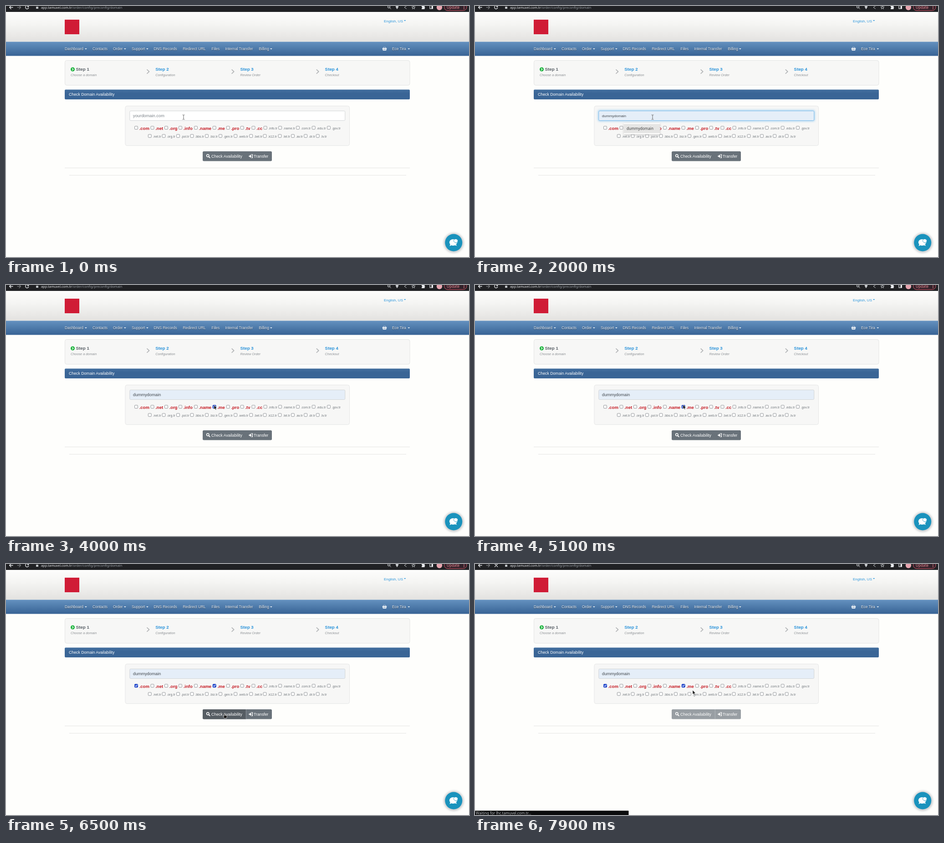
Recreate the animation shown at these times as an HTML page. Size 1017 px wide and 551 px high, loop 8 s.

```html
<!DOCTYPE html>
<html lang="en">
<head>
<meta charset="utf-8">
<title>Check Domain Availability</title>
<style>
html, body { margin: 0; width: 100%; height: 100%; overflow: hidden; background: #fefefc; }
svg { display: block; width: 100%; height: 100%; }
text { font-family: "Liberation Sans", Arial, sans-serif; white-space: pre; }
.ui { font-family: "Noto Sans", "Open Sans", sans-serif; }
.line { fill: none; stroke-linecap: round; stroke-linejoin: round; }
.nav { font-size: 8.4px; fill: #eef2f6; text-shadow: 0 .6px .8px #1d3552; }
.step { font-size: 9.8px; font-weight: bold; fill: #2b93da; }
.hint { font-size: 7.3px; font-style: italic; fill: #8d9195; }
.tld { font-size: 9.5px; font-weight: bold; fill: #c4161f; }
.sub { font-size: 7.1px; fill: #70767b; }
.btn { font-size: 8.75px; fill: #fff; }
.item { font-size: 8.2px; fill: #3a3a3a; }
</style>
</head>
<body>
<svg viewBox="0 0 1017 551" preserveAspectRatio="none">
  <defs>
    <linearGradient id="headFill" x2="0" y2="1"><stop stop-color="#fdfdfc"/><stop offset=".4" stop-color="#f5f5f3"/><stop offset="1" stop-color="#e3e2e0"/></linearGradient>
    <linearGradient id="navFill" x2="0" y2="1"><stop stop-color="#6491bf"/><stop offset="1" stop-color="#386395"/></linearGradient>
    <linearGradient id="titleFill" x2="0" y2="1"><stop stop-color="#436f9f"/><stop offset=".4" stop-color="#3a6596"/><stop offset="1" stop-color="#3a6596"/></linearGradient>
    <filter id="blur" x="-50%" y="-50%" width="200%" height="200%"><feGaussianBlur stdDeviation="2.2"/></filter>
  </defs>

  <rect width="1017" height="551" fill="#fefefc"/>
  <rect y="13" width="1017" height="65.5" fill="url(#headFill)"/>
  <rect y="78.5" width="1017" height="31" fill="url(#navFill)"/>
  <rect x="129" y="30" width="32" height="32" fill="#d01c36"/>

  <!-- browser bar -->
  <rect width="1017" height="13" fill="#202124"/>
  <g class="line" stroke="#e8eaed" stroke-width="1.3">
    <path d="M15 3H7.5M11-.5 7.5 3 11 6.5"/>
    <path d="M25 3H32.500M29-.5 32.500 3 29 6.500" stroke="#77797c"/>
    <path id="reload" d="M49 .5A3.600 3.600 0 1 0 49.700 4M49.700-1V1.500H47"/>
    <path id="stop" d="M43.500 0 49.500 6M49.500 0 43.500 6"/>
  </g>
  <rect x="66" y="1.500" width="5" height="4.500" rx=".6" fill="#c4c7ca"/>
  <text class="ui" x="77" y="5.800" font-size="7.35" fill="#e8eaed">app.tamuvel.com.tr<tspan fill="#9aa0a6">/order/config/preconfig/domain</tspan></text>
  <g class="line" stroke="#c4c7ca">
    <circle cx="841" cy="2" r="2.700"/><path d="M843 4 845.500 6.500M839.800 2H842.200"/>
    <path d="M879.500 0 875 3 879.500 6"/>
    <path d="M895-1 896 2H899L896.600 3.800 897.500 6.500 895 5 892.500 6.500 893.400 3.800 891 2H894Z"/>
  </g>
  <path d="M859 7C856 3 856 2 856 1A3 3 0 0 1 862 1C862 2 862 3 859 7Z" fill="#c4c7ca"/>
  <path d="M913 0H915A1.500 1.500 0 0 1 918 0H919.500V2.200A1.500 1.500 0 0 1 919.500 5V7H913V4.800A1.300 1.300 0 0 0 913 2.200Z" fill="#e8eaed"/>
  <path d="M930.500-1H938V6.500H930.500ZM931.700 0V5.300H934.500V0Z" fill="#e8eaed" fill-rule="evenodd"/>
  <circle cx="952" cy="3" r="6.200" fill="#e7a5b0"/>
  <rect x="962.500" y="-5" width="49.500" height="15" rx="7.500" fill="#33222a" stroke="#dd5a6d"/>
  <text class="ui" x="968" y="5.800" font-size="8.200" fill="#f28b96">Update</text>
  <g fill="#f28b96"><circle cx="1006" cy="0" r=".9"/><circle cx="1006" cy="3" r=".9"/><circle cx="1006" cy="6" r=".9"/></g>

  <!-- page frame -->
  <text x="830" y="35.500" font-size="8.050" fill="#2f97dc">English, US</text>
  <path d="M874 31H878.400L876.200 33.300Z" fill="#2f97dc"/>
  <g id="nav"></g>
  <path d="M827 92.500H836L834.800 97.500H828.200ZM828.500 92.500 830.500 89.500M834.500 92.500 832.500 89.500" fill="#eef2f6" stroke="#eef2f6" stroke-width=".8"/>
  <path d="M829.700 94V96.300M831.500 94V96.300M833.300 94V96.300" stroke="#47719f" stroke-width=".7"/>
  <rect x="129.500" y="119.500" width="757.500" height="54.500" rx="4" fill="#f7f7f6" stroke="#e3e4e4"/>
  <g id="steps"></g>
  <circle cx="146.500" cy="139" r="4.500" fill="#1fb53f"/>
  <path class="line" d="M145.600 136.900 147.900 139 145.600 141.100" stroke="#fff" stroke-width="1.300"/>
  <rect x="129" y="183.500" width="758" height="21.500" rx="2" fill="url(#titleFill)"/>
  <text x="138" y="197" font-size="8.740" fill="#fff">Check Domain Availability</text>
  <rect x="262" y="219.500" width="492.500" height="87" rx="4" fill="#f7f7f6" stroke="#e5e6e6"/>
  <path d="M129 355.500H887M139 371.500H879" stroke="#e4e4e3"/>

  <!-- search form -->
  <rect id="glow" x="270" y="228.300" width="476.500" height="25" rx="4" fill="#6fb8ee" filter="url(#blur)"/>
  <rect id="field" x="271.800" y="230.300" width="473" height="21.200" rx="2.300"/>
  <text id="value" x="279" y="243.600"></text>
  <rect id="caret" y="236" width=".8" height="9.500" fill="#333"/>
  <g id="boxes"></g>
  <g id="buttons">
    <rect x="432" y="319" width="152" height="21.500" rx="2.500" fill="#69727a"/>
    <path id="hover" d="M434.500 319H527V340.500H434.500A2.500 2.500 0 0 1 432 338V321.500A2.500 2.500 0 0 1 434.500 319Z" fill="#565d63"/>
    <path id="split" d="M527.300 319V340.500" stroke="#9aa1a7" stroke-width=".8"/>
    <g class="line" stroke="#fff"><circle cx="443.300" cy="328.600" r="2.700" stroke-width="1.500"/><path d="M445.500 330.800 447.800 333.100" stroke-width="1.900"/><path d="M539 326.200H541.500V333.200H539" stroke-width="1.300"/></g>
    <path d="M533.500 328.500H536V326L539.800 329.700 536 333.400V330.900H533.500Z" fill="#fff"/>
    <text class="btn" x="451" y="332.700">Check Availability</text>
    <text class="btn" x="544" y="332.700">Transfer</text>
  </g>
  <g id="list"></g>

  <!-- chat bubble -->
  <circle cx="983.500" cy="520" r="22" fill="#b9bcc0" opacity=".75" filter="url(#blur)"/>
  <circle cx="983.300" cy="519.500" r="19" fill="#1a93bd"/>
  <path d="M982 512C987 512 990.500 515 990.500 519S987 526 982 526C980.500 526 979.500 525.700 978.500 525.300L974.500 527 975.800 523C974.500 521.800 974 520.500 974 519C974 515 977.500 512 982 512Z" fill="#fff"/>
  <path d="M987 511.500C990 511 992.500 513 992.500 515.500 992.500 516.800 992 517.500 991.300 518.200L992.500 520.500 989 519.500C986 520 983.500 518 983.500 515.500S985 511.700 987 511.500Z" fill="#fff" stroke="#1a93bd" stroke-width=".8"/>
  <path d="M987 521.500 990.500 526.500 985 525Z" fill="#fff"/>

  <g id="status"><rect y="541.500" width="337.500" height="10" rx="1" fill="#0b0c0d"/><text class="ui" x="1.500" y="549.700" font-size="8.200" fill="#b9bcbf">Waiting for lhc.tamuvel.com.tr…</text></g>

  <g id="cursor">
    <path id="beam" class="line" d="M-2-5C-.8-5 0-4.600 0-4 0-4.600.8-5 2-5M0-4V4M-2 5C-.8 5 0 4.600 0 4 0 4.600.8 5 2 5" stroke="#555" stroke-width=".9"/>
    <path id="arrow" d="M0 0V9L2.100 7.200 3.500 10.200 5 9.500 3.700 6.600H6.500Z" fill="#111" stroke="#fff" stroke-width=".6"/>
    <path id="hand" d="M-1 0C-1-1.300 1-1.300 1 0V3.200L4 3.700C5.200 4 5.400 4.700 5.300 5.700L4.600 9.500H-.8L-3 6C-3.500 5-2.300 4.300-1 5.600Z" fill="#111" stroke="#fff" stroke-width=".7"/>
  </g>
</svg>

<script>
const LOOP = 8000, STEP = 100;
const $ = id => document.getElementById(id);
const show = (id, on) => $(id).style.display = on ? "" : "none";
const clamp = v => Math.max(0, Math.min(1, v));
const text = (cls, x, y, s) => `<text class="${cls}" x="${x}" y="${y}">${s}</text>`;

// label, x, optional x of the dropdown triangle
const menu = [["Dashboard", 129, 173], ["Contacts", 190], ["Order", 235, 259], ["Support", 276, 308],
  ["DNS Records", 324.5], ["Redirect URL", 388.5], ["Files", 451.5], ["Internal Transfer", 481.5],
  ["Billing", 555.5, 580], ["Ece Tira", 848, 882.5]];
$("nav").innerHTML = menu.map(([s, x, tri]) => text("nav", x, 97, s) +
  (tri ? `<path d="M${tri} 93h4.800l-2.400 2.500z" fill="#eef2f6"/>` : "")).join("");

$("steps").innerHTML = ["Choose a domain", "Configuration", "Review Order", "Checkout"].map((s, i) => {
  const x = 142 + 186.200 * i;
  return (i ? text("step", x, 142.300, "Step " + (i + 1)) : '<text class="step" x="153.500" y="142.300" style="fill:#596067">Step 1</text>')
    + text("hint", x, 153.700, s)
    + (i < 3 ? `<path class="line" d="M${x + 168} 139.800l4.500 4.200-4.500 4.200" stroke="#b5b7b9" stroke-width="1.800"/>` : "");
}).join("");

const rows = [
  [267.3, "com 286 net 321.5 org 352 info 383 name 417 me 457.7 pro 487.7 tv 518.7 cc 543.5 " +
    "info.tr 569.7 name.tr 602.2 com.tr 641 edu.tr 675.7 gov.tr 709"],
  [285.3, "net.tr 315.8 org.tr 346.5 pol.tr 378 bbs.tr 408.5 biz.tr 441 gen.tr 471 web.tr 504.2 " +
    "bel.tr 538.3 k12.tr 568.5 tel.tr 601.5 av.tr 630 dr.tr 658.2 tv.tr 684.7"]];
const square = (x, y, look) => `<rect x="${x - 3.4}" y="${y - 3.4}" width="6.800" height="6.800" rx="1.200" ${look}/>`;
const ticked = (id, x, y) => `<g id="${id}">${square(x, y, 'fill="#2148cf" stroke="#2148cf"')}` +
  `<path class="line" d="M${x - 2} ${y}l1.500 1.600 2.600-3.300" stroke="#fff" stroke-width="1.200"/></g>`;
$("boxes").innerHTML = rows.map(([y, list]) => list.match(/\S+ \S+/g).map(pair => {
  const [name, pos] = pair.split(" "), x = +pos, small = name.includes(".");
  return square(x, y, 'fill="#fff" stroke="#777b80" stroke-width=".8"')
    + text(small ? "sub" : "tld", x + 6.7, y + (small ? 3.700 : 4.200), "." + name);
}).join("")).join("") + ticked("com", 286, 267.3) + ticked("me", 457.7, 267.3);

const past = ["test.com.tr", "28kasim1.biz.tr", "test.gov.tr", "asd", "test", "a"];
let listKey = "";
function drawList(items, lit) {
  const key = items + lit;
  if (key === listKey) return;
  listKey = key;
  const h = items.length * 19.9 + 4.5;
  $("list").innerHTML = !items.length ? "" :
    `<rect x="327" y="258.500" width="79" height="${h}" fill="#999" opacity=".55" filter="url(#blur)"/>` +
    `<rect x="326.500" y="257" width="79.500" height="${h}" rx="1" fill="#fefefd"/>` +
    (lit ? '<rect x="326.500" y="259" width="79.500" height="20" fill="#e5e5e4"/>' : "") +
    items.map((s, i) => text("item ui", 333, 271.7 + 19.9 * i, s)).join("");
}

const WORD = "dummydomain";
const typed = [[800, 1], [1000, 2], [1300, 3], [1400, 4], [2000, 11]];

// time, x, y of the pointer
const path = [[0, 390, 244], [2800, 390, 244], [3200, 463, 275], [3400, 465, 279], [3700, 457, 264],
  [4300, 457, 264], [4500, 422, 259], [4900, 505, 264], [5000, 505, 264], [5100, 457, 263],
  [5200, 350, 266], [5300, 350, 266], [5700, 285, 266], [5900, 285, 266], [6400, 480, 329],
  [6700, 480, 329], [6800, 470, 296], [7000, 425, 248], [7100, 425, 248], [7400, 427, 256],
  [7500, 427, 256], [7900, 478, 277], [LOOP, 478, 277]];
function pointer(t) {
  const i = path.findIndex(p => p[0] > t), [t0, x0, y0] = path[i - 1], [t1, x1, y1] = path[i];
  const k = (t - t0) / (t1 - t0);
  return [x0 + (x1 - x0) * k, y0 + (y1 - y0) * k];
}

function draw(t) {
  const [x, y] = pointer(t);
  const loading = t >= 6700, preview = t >= 2000 && t < 2400;
  const focus = clamp((t - 200) / 200) * clamp((4000 - t) / 300);

  $("glow").setAttribute("opacity", focus * .55);
  const field = $("field");
  field.setAttribute("fill", t >= 2000 ? "#e5eef8" : "#fff");
  field.setAttribute("stroke", focus > .4 ? "#7dbdea" : "#d2d5d8");

  const count = typed.reduce((n, [at, len]) => t >= at ? len : n, 0);
  const value = $("value");
  value.textContent = count ? WORD.slice(0, count) : "yourdomain.com";
  value.setAttribute("font-size", preview ? 8.1 : 9.33);
  value.setAttribute("fill", count ? "#41474d" : "#7b8289");
  show("caret", count && t < 2000);
  if (count) $("caret").setAttribute("x", 279 + value.getComputedTextLength());

  const open = t >= 400 && t < 2400;
  drawList(!open ? [] : t < 1000 ? past : [WORD], preview);

  show("me", t >= 3800);
  show("com", t >= 5700);

  const over = y > 319 && !loading;
  show("hover", over);
  show("split", over || loading);
  $("buttons").setAttribute("opacity", loading ? .68 : 1);
  show("reload", !loading);
  show("stop", loading);
  show("status", loading);

  const beam = y > 230 && y < 251.5;
  show("beam", beam);
  show("hand", over);
  show("arrow", !beam && !over);
  $("cursor").setAttribute("transform", `translate(${x} ${y})`);
}

function tick() {
  const t = performance.now() % LOOP;
  draw(Math.floor(t / STEP) * STEP);
  requestAnimationFrame(tick);
}
tick();
</script>
</body>
</html>
```
